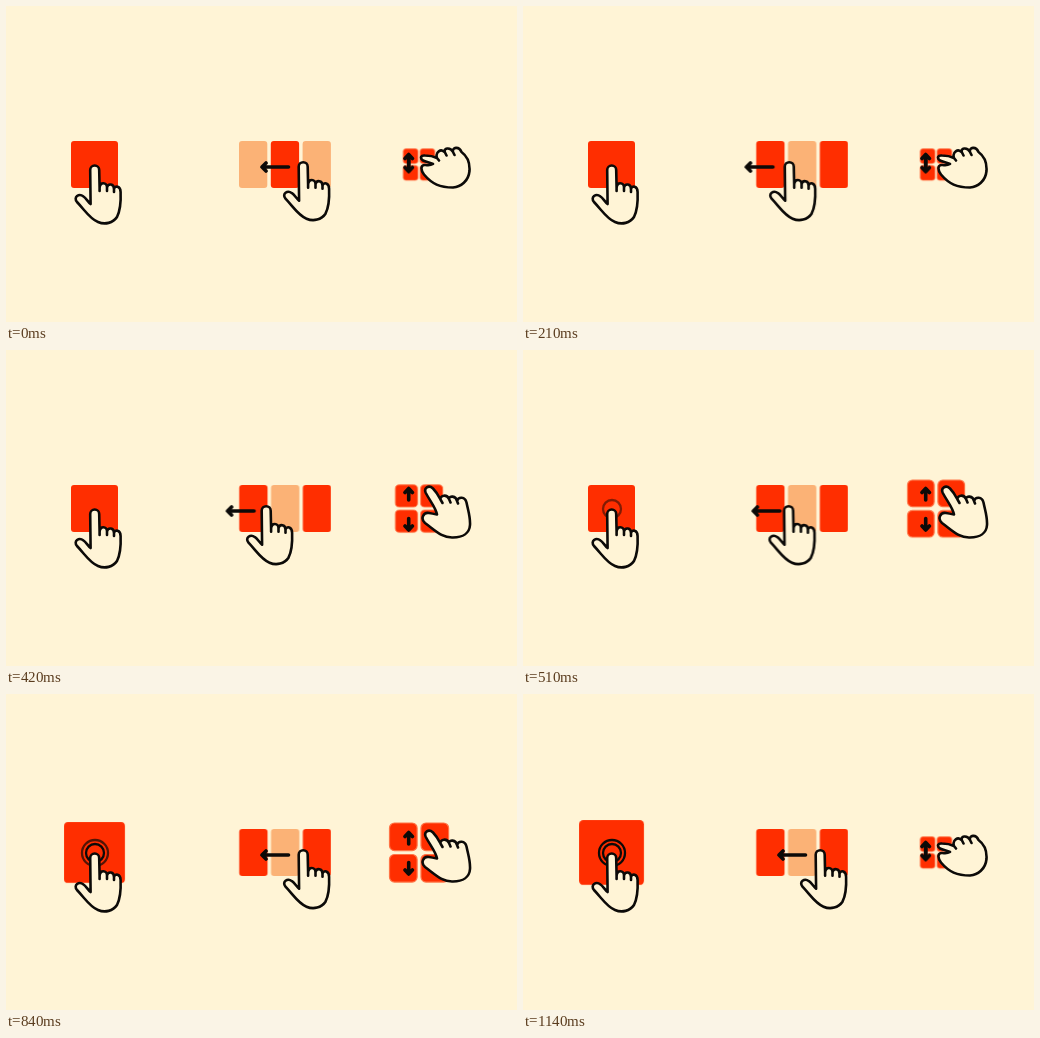
An HTML page without scripts that plays this animation: 511 by 316 pixels, repeating every 1200 ms.

```html
<!DOCTYPE html>
<html lang="en">
<head>
<meta charset="utf-8">
<title>Touch gestures</title>
<style>
  html, body { margin: 0; width: 100%; height: 100%; overflow: hidden; background: #fff4d6; }
  svg { display: block; width: 511px; height: 316px; }

  .red { fill: #ff2e00; }
  .peach { fill: #fbb276; }
  .soft { stroke: #ff7446; stroke-width: 1.2; }
  .hand, .arrow, .ring { stroke: #0c0a08; stroke-linecap: round; stroke-linejoin: round; }
  .hand { fill: #fff4d6; stroke-width: 2.6; }
  .arrow { fill: none; stroke-width: 3.6; }
  .ring { fill: none; stroke-width: 2.3; }

  .anim { animation: 1200ms ease-in-out infinite; }

  /* Tap */
  .square { animation-name: grow; transform-origin: 88.5px 158.5px; }
  .inner { animation-name: show-inner; }
  .outer { animation-name: show-outer; }
  @keyframes grow { 0%, 60% { transform: scale(1); } 75%, 100% { transform: scale(1.38); } }
  @keyframes show-inner { 0%, 37.5% { opacity: 0; } 47.5%, 100% { opacity: 1; } }
  @keyframes show-outer { 0%, 62% { opacity: 0; } 75%, 100% { opacity: 1; } }

  /* Swipe */
  .strip { animation-name: slide; }
  .swipe-arrow { animation-name: swipe-arrow; }
  .swipe-hand { animation-name: swipe-hand; }
  @keyframes slide { 0% { transform: none; } 17.5%, 100% { transform: translateX(-31.6px); } }
  @keyframes swipe-arrow {
    0%, 2.5%, 63.5%, 100% { transform: translateX(0); }
    21.7%, 30.2% { transform: translateX(-36px); }
  }
  @keyframes swipe-hand {
    0%, 5%, 57.5%, 100% { transform: translateX(0); }
    22.5%, 37.2% { transform: translateX(-37px); }
  }

  /* Pinch */
  .tiles { animation-name: zoom; transform-origin: 413px 158.5px; }
  .up { --closed: 10px; animation-name: spread; }
  .down { --closed: -14.5px; animation-name: spread; }
  .pinch-hand { animation-name: pinch; }
  @keyframes zoom {
    0%, 19.7%, 95%, 100% { transform: scale(.533); }
    48%, 85% { transform: scale(1); }
  }
  @keyframes spread {
    0%, 16.7%, 91%, 100% { transform: translateY(var(--closed)); }
    33.3%, 77.5% { transform: translateY(0); }
  }
  @keyframes pinch {
    0%, 18.3%, 94.2%, 100% {
      d: path("M427 158C424 156.5 420 156 417 154.5C413.5 152 415 149 419 149.5C424 149.5 428 150.5 431 152C429 146 435 142 439 146.5C437 142 444 140.5 447 146C446 141 453 140 455.5 146C461 150 464 157 463.5 165C462.5 175 455 181 447 181.5C434 181.5 426 178 418 168.5C414 163 415 158.5 419.5 159C422 159.5 424.5 159.5 427 158ZM431 152L433 154.5M439 146.5L440.5 149.5M447 146L448.5 149");
    }
    34.2%, 83.3% {
      d: path("M431 164.5C430 158 424 151 419.8 143C417.5 138 422.5 134.5 427 138.5C430 141.5 432.5 145.5 434.5 149.5C434 145 441 144 443 149C443 145.5 450 145.5 451 151C452.5 146.5 459 146.5 460.5 152.5C462 160 464.5 167 464 175C463.5 183 457 187.5 447 187.5C436 188 430 181 419 173C414 168.5 417.5 162 423 163C426 163.5 428.5 164 431 164.5ZM434.5 149.5L436.5 153M443 149L444.5 152.5M451 151L452 153.5");
    }
  }
</style>
</head>
<body>
<svg viewBox="0 0 511 316">
  <defs>
    <path id="pointer" class="hand" d="M84.6 198L84.2 164a4.5 4.5 0 0 1 9 0L93.6 182C94 175.5 101 176 101 181.5C102 177 108 177.5 108 183C109 179 114.5 180 114.6 186C115 196 114.5 204 111 211C107 217 99 219 92 216C84 213 79.5 205 71 196C67 191 73 187 77.5 190.5C80 192 82 196 84.6 198ZM93.6 180v5M101 181v4M108 182v4"/>
    <rect id="card" y="135" width="28.3" height="47" rx="3"/>
    <rect id="tile" width="27.6" height="27.6" rx="5"/>
    <clipPath id="window"><rect x="232.5" y="134" width="92.5" height="49" rx="2"/></clipPath>
  </defs>

  <rect class="anim square red" x="65" y="135" width="47" height="47" rx="3"/>
  <circle class="anim ring inner" cx="89" cy="159" r="9"/>
  <circle class="anim ring outer" cx="89" cy="159" r="13"/>
  <use href="#pointer"/>

  <g clip-path="url(#window)">
    <g class="anim strip">
      <use href="#card" x="233" class="peach"/>
      <use href="#card" x="264.8" class="red"/>
      <use href="#card" x="296.6" class="peach"/>
      <use href="#card" x="328.4" class="red"/>
    </g>
  </g>
  <path class="anim arrow swipe-arrow" d="M282.5 161H256M260 157L256 161L260 165"/>
  <g class="anim swipe-hand"><use href="#pointer" x="208.5" y="-3.3"/></g>

  <g class="anim tiles red soft">
    <use href="#tile" x="383.5" y="129"/>
    <use href="#tile" x="415" y="129"/>
    <use href="#tile" x="383.5" y="160.5"/>
    <use href="#tile" x="415" y="160.5"/>
  </g>
  <path class="anim arrow up" d="M402.7 150V138.5M399 142.5L402.7 138.5L406.4 142.5"/>
  <path class="anim arrow down" d="M402.7 168.5V180M399 176L402.7 180L406.4 176"/>
  <path class="anim hand pinch-hand"/>
</svg>
</body>
</html>
```
